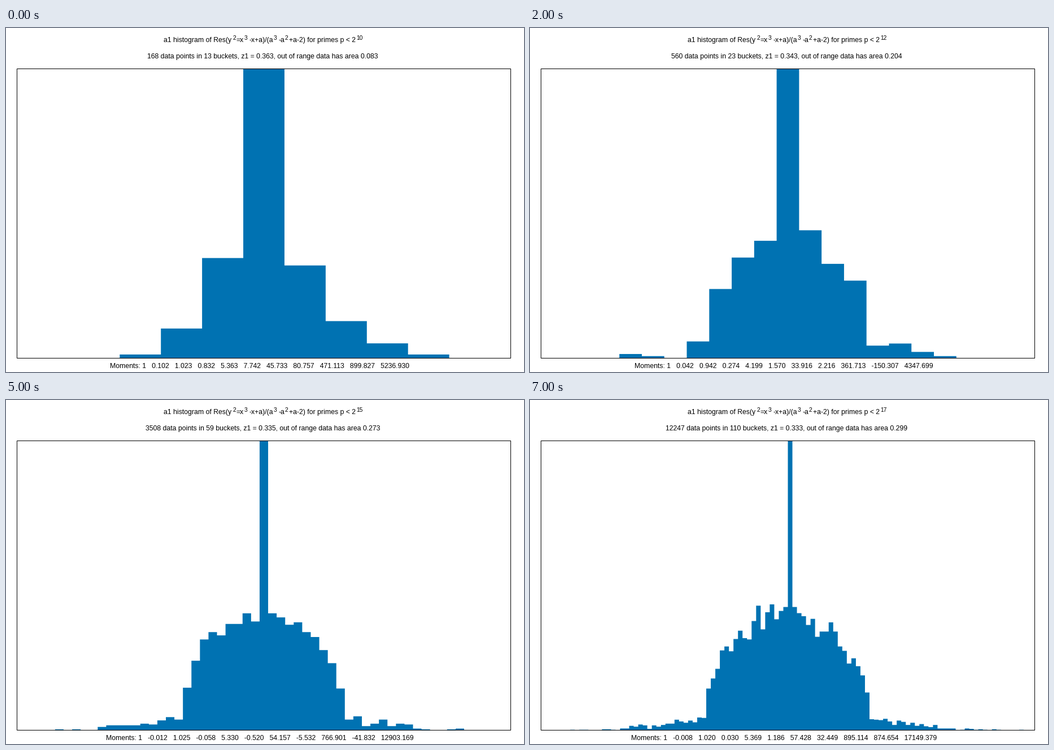
A matplotlib script that plays this animation: 917x611 px, repeating every 8000 ms.

```python
import math

import matplotlib.pyplot as plt
import numpy as np
from matplotlib.animation import FuncAnimation
from matplotlib.patches import Rectangle

W, H, DPI = 917, 611, 100
FIRST, LAST = 10, 17
BLUE = "#0072b2"
LEFT, RIGHT, TOP, BOTTOM = 19, 894, 72.5, 586.5
BAD = (2, 3, 83, 131)  # primes left out of the statistics


def sieve(limit):
    flags = np.ones(limit, bool)
    flags[:2] = False
    for i in range(2, math.isqrt(limit) + 1):
        if flags[i]:
            flags[i * i::i] = False
    return np.flatnonzero(flags)


def cubic_roots(primes):
    """Roots of a^3 - a^2 + a - 2 modulo each prime."""
    n = np.arange(2.0 ** LAST)
    values = ((n - 1) * n + 1) * n - 2
    roots = []
    for p in primes:
        q = values[:p] / p
        roots.append(np.flatnonzero(q == np.rint(q)))
    return roots


def brute_sum(b, p):
    """Sum of the quadratic character of x^3 - x + b over all x."""
    x = np.arange(p)
    sq = x * x % p
    chi = np.full(p, -1)
    chi[sq] = 1
    chi[0] = 0
    return chi[(sq * x - x + b) % p].sum()


def character_sums(b, p):
    """The same sums for many curves at once, from multiples of the point x = 2
    on a twist, in x-only projective coordinates."""

    def double(u):
        x, z = u
        xx, zz = x * x % p, z * z % p
        return (((xx + zz) ** 2 - 8 * b * (x * z % p * zz % p)) % p,
                4 * z * ((x * (xx - zz) + b * (z * zz % p)) % p) % p)

    def add(u, v, diff):
        m, n = u[0] * v[1] % p, v[0] * u[1] % p
        z = u[1] * v[1] % p
        s = (m + n) * (u[0] * v[0] % p - z) % p + 2 * b * (z * z % p)
        d = (m - n) ** 2 % p
        return (2 * s % p * diff[1] - diff[0] * d) % p, d * diff[1] % p

    def pick(cond, u, v):
        return np.where(cond, u[0], v[0]), np.where(cond, u[1], v[1])

    def same(u, v):
        return (u[0] * v[1] - v[0] * u[1]) % p == 0

    one = np.ones_like(p)
    origin, base = (one, 0 * one), (2 * one, one)

    # Ladder: lo = p * base, hi = (p + 1) * base
    lo, hi = origin, base
    for bit in range(LAST - 1, -1, -1):
        on = ((p >> bit) & 1) == 1
        mid = add(lo, hi, base)
        lo, hi = pick(on, mid, double(lo)), pick(on, double(hi), mid)

    # Find the trace t with hi = t * base and lo = (t - 1) * base
    limit = np.floor(2 * np.sqrt(p)).astype(int)
    trace, hits = 0 * p, 0 * p
    q0 = r0 = np.zeros(len(p), bool)
    prev, cur = base, origin
    for k in range(limit.max() + 2):
        q, r = same(cur, hi), same(cur, lo)
        up, down = q & r0 & (k <= limit), q0 & r & (k - 1 <= limit)
        trace = np.where(up, k, np.where(down, 1 - k, trace))
        hits = hits + up + down
        if k:
            hits = hits + 9 * (cur[1] == 0)
        if k == 0:
            nxt = base
        elif k == 1:
            nxt = double(base)
        else:
            nxt = add(cur, base, prev)
        prev, cur, q0, r0 = cur, nxt, q, r

    twist = [1 if pow(d, (m - 1) // 2, m) == 1 else -1
             for d, m in zip(((b + 6) % p).tolist(), p.tolist())]
    sums = -np.array(twist) * trace
    for i in np.flatnonzero(hits != 1):  # ambiguous: count directly
        sums[i] = brute_sum(b[i], p[i])
    return sums


primes = sieve(2 ** LAST)
primes = primes[~np.isin(primes, BAD)]
roots = cubic_roots(primes)
owner = np.repeat(np.arange(len(primes)), [len(r) for r in roots])
sums = character_sums(np.concatenate(roots), primes[owner])
a1 = np.bincount(owner, sums, len(primes)) / np.sqrt(primes)
a1 *= np.sign(a1[primes < 2 ** FIRST].sum())  # the first mean is positive

fig = plt.figure(figsize=(W / DPI, H / DPI), dpi=DPI, facecolor="white")
ax = fig.add_axes([0, 0, 1, 1])
ax.set_xlim(0, W)
ax.set_ylim(H, 0)
ax.axis("off")


def label(x, y, text="", px=12.28, ha="left"):
    return ax.text(x, y, text, ha=ha, va="baseline", color="black",
                   family="Liberation Sans", size=px * 72 / DPI)


for x, part in ((279.4, "a1 histogram of Res(y"), (407.4, "=x"),
                (430.2, "-x+a)/(a"), (482.2, "-a"),
                (500.8, "+a-2) for primes p < 2")):
    label(x, 25, part)
for x, part in ((401, "2"), (422, "3"), (474, "3"), (494, "2")):
    label(x, 21, part, 10.2)
power = label(620.5, 21, "", 10.2)
info = label(454.2, 54, ha="center")
moments = label(449.2, 604, ha="center")

bars = ax.stairs([0], [LEFT, RIGHT], baseline=BOTTOM, fill=True, color=BLUE,
                 lw=0, snap=False, zorder=1)
ax.add_patch(Rectangle((19.5, TOP), 874, BOTTOM - TOP, fill=False, ec="black",
                       lw=72 / DPI, snap=False, zorder=2))


def draw(i):
    e = FIRST + i
    data = a1[primes < 2 ** e]
    total = len(data)
    n = math.isqrt(total + len(BAD))
    bucket = np.floor((data + 6) / 12 * (n - 1) + 0.5).astype(int)
    counts = np.bincount(bucket, minlength=n)
    cap = 6 * n
    shown = np.minimum(counts, cap)

    edges = LEFT + (np.arange(n + 1) - 0.5) * (RIGHT - LEFT) / (n - 1)
    bars.set_data(BOTTOM - shown * (BOTTOM - TOP) / cap,
                  np.clip(edges, LEFT, RIGHT), BOTTOM)

    power.set_text(str(e))
    info.set_text(f"{total} data points in {n} buckets, "
                  f"z1 = {np.mean(data == 0):.3f}, out of range data has area "
                  f"{(counts - shown).sum() / total:.3f}")
    moments.set_text("   ".join(
        ["Moments: 1"] + [f"{np.mean(data ** k):.3f}" for k in range(1, 11)]))
    return bars, power, info, moments


anim = FuncAnimation(fig, draw, frames=LAST - FIRST + 1, interval=1000,
                     repeat=True, blit=False)
plt.show()
```
